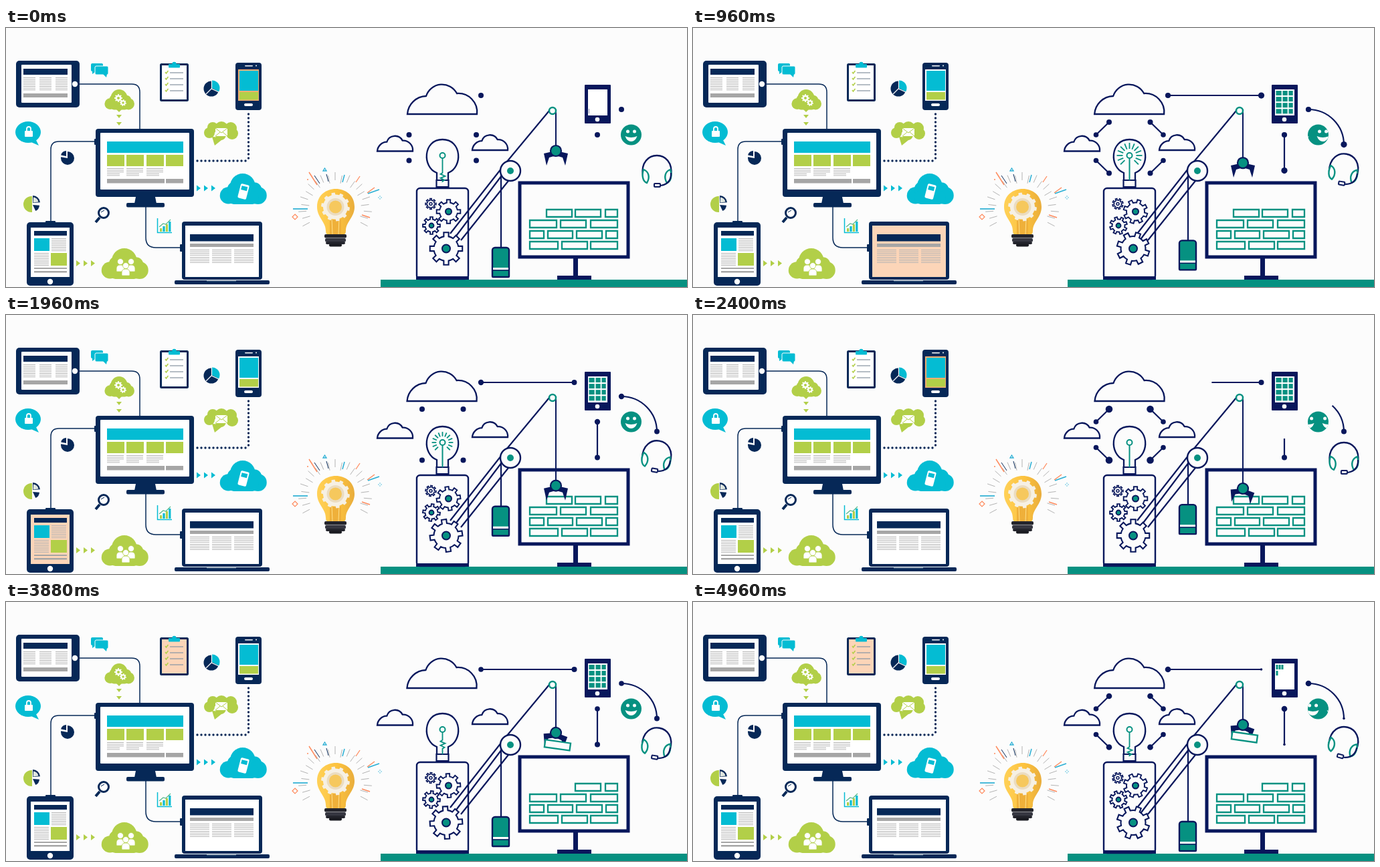
These frames come from a looping animation (1018 px wide and 388 px high, 5.04 s). An HTML page with a canvas:

```html
<!DOCTYPE html>
<html lang="en">
<head>
<meta charset="utf-8">
<title>Connected devices and idea machine</title>
<style>
html, body { margin: 0; height: 100%; overflow: hidden; background: #fcfcfc; }
canvas { display: block; }
</style>
</head>
<body>
<canvas id="stage" width="1018" height="388"></canvas>
<script>
const c = document.getElementById('stage').getContext('2d');
const LOOP = 5040, TAU = Math.PI * 2;
const BG = '#fcfcfc', NAVY = '#062857', INK = '#08175c', TEAL = '#04bcd3', LIME = '#b2cf48',
  GREEN = '#069181', GRAY = '#a6a6a6', PEACH = '#fcd5b8', WHITE = '#fff';

// Linear interpolation through [time, value] pairs
function key(t, ...pts) {
  if (t <= pts[0][0]) return pts[0][1];
  for (let i = 1; i < pts.length; i++) {
    const [a, u] = pts[i - 1], [b, v] = pts[i];
    if (t <= b) return u + (v - u) * (t - a) / (b - a);
  }
  return pts[pts.length - 1][1];
}

function paint(fill, stroke, width = 2.4) {
  if (fill) { c.fillStyle = fill; c.fill(); }
  if (stroke) { c.strokeStyle = stroke; c.lineWidth = width; c.stroke(); }
}
function box(x, y, w, h, fill, r = 0, stroke, width) {
  c.beginPath(); c.roundRect(x, y, w, h, r); paint(fill, stroke, width);
}
function dot(x, y, r, fill, stroke, width) {
  if (r <= 0) return;
  c.beginPath(); c.arc(x, y, r, 0, TAU); paint(fill, stroke, width);
}
function poly(pts, fill) {
  c.beginPath();
  for (let i = 0; i < pts.length; i += 2) c.lineTo(pts[i], pts[i + 1]);
  c.closePath(); paint(fill);
}
function path(d, fill, stroke, width) {
  const p = new Path2D(d);
  if (fill) { c.fillStyle = fill; c.fill(p); }
  if (stroke) { c.strokeStyle = stroke; c.lineWidth = width || 2.4; c.stroke(p); }
}
function line(x1, y1, x2, y2, color = INK, width = 2.2) {
  c.beginPath(); c.moveTo(x1, y1); c.lineTo(x2, y2); paint(null, color, width);
}
function at(x, y, angle, draw) {
  c.save(); c.translate(x, y); c.rotate(angle); draw(); c.restore();
}
function copy(x, y, w, n, gap = 2.6) {
  for (let i = 0; i < n; i++) box(x, y + i * gap, w, 1, '#b4b4b4');
}
function sector(x, y, r, a, b, fill) {
  c.beginPath(); c.moveTo(x, y); c.arc(x, y, r, a * TAU, b * TAU); c.closePath(); paint(fill);
}
function puff(x, y, w, h, fill) {
  for (const [u, v, r] of [[.18, .7, .27], [.32, .5, .24], [.49, .4, .4], [.74, .52, .24], [.82, .7, .28]])
    dot(x + w * u, y + h * v, h * r, fill);
  box(x + w * .16, y + h * .55, w * .68, h * .43, fill, h * .2);
}
function cloud(x, y, w, h) {
  const p = new Path2D();
  p.addPath(new Path2D('M0 44A29 29 0 0 1 28 17A25 25 0 0 1 74 13A28 28 0 0 1 104 44Z'),
    { a: w / 104, d: h / 44, e: x, f: y });
  path(p, BG, INK, 2.3);
}
function gear(x, y, r, R, n, a, fill, stroke, width) {
  c.beginPath();
  for (let i = 0; i < n; i++) {
    const m = a + i * TAU / n, s = TAU / n;
    for (const [q, k] of [[-.25, r], [-.19, R], [.19, R], [.25, r]])
      c.lineTo(x + k * Math.cos(m + q * s), y + k * Math.sin(m + q * s));
    c.arc(x, y, r, m + .25 * s, m + .75 * s);
  }
  c.closePath(); paint(fill, stroke, width);
}
function arrows(x, y, color, down) {
  for (let i = 0; i < (down ? 2 : 3); i++) {
    if (down) poly([x - 4, y + i * 11, x + 4, y + i * 11, x, y + 5 + i * 11], color);
    else poly([x + i * 11, y - 4.5, x + 6 + i * 11, y, x + i * 11, y + 4.5], color);
  }
}

function devices(t) {
  const lit = [120, 320, 480, 680, 880, 1080].findIndex(v => t % 1160 < v);
  const paper = i => Math.max(lit, 0) === i ? PEACH : WHITE;

  // Cables
  path('M110 84H188Q200 84 200 96V152M135 170H79Q67 170 67 182V291M209 266V314Q209 329 224 329H262', null, NAVY, 1.5);
  box(132, 166, 4, 9, NAVY, 1); box(59, 289, 15, 4, NAVY, 1); box(260, 324, 4, 11, NAVY, 1);
  for (let y = 129; y < 196; y += 6) dot(362.5, y, 1.7, NAVY);
  for (let x = 286; x < 364; x += 6) dot(x, 199, 1.7, NAVY);

  // Landscape tablet
  box(15, 49, 95, 70, NAVY, 5); box(23, 55, 75, 57, paper(3), 1);
  box(26, 61, 66, 9, NAVY);
  for (const x of [26, 50, 74]) copy(x, 74, 18, 8);
  box(26, 98, 66, 6, GRAY); dot(103, 84, 4.2, WHITE);

  // Speech bubbles
  box(127, 53, 18, 12, TEAL, 2); poly([129, 64, 136, 64, 129, 69], TEAL);
  box(133, 57, 20, 13, TEAL, 2, BG, 1); poly([145, 69, 151, 69, 150, 74], TEAL);

  // Clipboard
  box(231.5, 54.5, 40, 54, paper(2), 1, NAVY, 3);
  box(243, 54, 17, 5.5, TEAL, 1); dot(251.5, 54, 3.2, TEAL);
  for (const y of [67, 76, 85, 94]) {
    path(`M238 ${y - 1}l1.5 2 3-4`, null, LIME, 1.5);
    line(245, y, 265, y, '#8d9aa6', 1.3);
  }

  // Pie charts
  dot(307, 91, 11.5, NAVY); sector(308, 90, 11.5, -.25, .08, TEAL);
  path('M307.5 79V91L318 96M307 91L299 99', null, BG, 1.2);
  sector(92, 195, 10, -.25, .53, NAVY); sector(90, 192, 8, .53, .75, NAVY);
  dot(38, 264, 12, LIME); sector(39, 264, 13, -.25, .25, BG);
  sector(40, 262, 11, -.25, -.01, NAVY); sector(40, 265, 10, .01, .18, NAVY);
  sector(40.5, 261.5, 8, -.24, -.02, '#dfe6df');

  // Phone
  box(343, 52, 39, 71, NAVY, 4);
  box(347, 62, 31, 47, lit < 1 ? '#f0ae72' : WHITE);
  box(349, 64, 28, 30, TEAL); box(349, 96, 28, 11.5, LIME);
  box(356, 113, 13, 4, WHITE, 2); box(357, 56, 12, 1.6, WHITE, 1); dot(374, 56.5, 1, WHITE);

  // Lime cloud with gears
  puff(148, 92, 43, 31, LIME); poly([163, 120, 175, 120, 169, 126], LIME);
  gear(168, 105, 4.5, 6, 8, 0, WHITE); dot(168, 105, 2, LIME);
  gear(175, 112, 3.8, 5, 8, .2, WHITE); dot(175, 112, 1.7, LIME);
  arrows(169, 130, LIME, true);

  // Lock bubble
  c.beginPath(); c.ellipse(33, 156, 19, 16, 0, 0, TAU); paint(TEAL);
  poly([33, 169, 44, 166, 49, 176], TEAL);
  box(28, 154, 12, 9, WHITE, 1); path('M31 155V151a3 3 0 0 1 6 0V155', null, WHITE, 1.8);

  // Mail cloud
  for (const [x, y, r] of [[304, 157, 8], [309, 149, 8], [322, 150, 10], [336, 150, 9], [338, 158, 9], [321, 160, 8]])
    dot(x, y, r, LIME);
  poly([308, 163, 327, 164, 312, 176], LIME);
  box(313, 150, 18, 12, WHITE, 1); path('M313 150l9 7 9-7M313 162l7-6M331 162l-7-6', null, LIME, 1);

  // Desktop screen
  box(134, 151, 147, 102, NAVY, 4); box(141, 157, 133, 85, paper(1), 1);
  box(151, 170, 114, 17, TEAL);
  for (const x of [151, 180, 210, 239]) box(x, 190, 26, 17, LIME);
  for (const x of [151, 180, 210]) { copy(x, 210, 25, 3); copy(x, 217.8, 19, 2); }
  box(151, 226, 86, 6.5, GRAY); box(239, 226, 26, 6.5, GRAY);
  poly([194, 253, 223, 253, 225, 263, 192, 263], NAVY); box(180, 262, 57, 6.5, NAVY, 2);
  arrows(285, 240, TEAL);

  // Teal cloud
  puff(320, 218, 69, 47, TEAL);
  at(355, 245, .25, () => { box(-6.5, -11, 13, 22, WHITE, 2); box(-4.5, -8, 9, 6, TEAL); });

  // Magnifier
  line(140, 284, 134, 291, NAVY, 4); dot(146, 277, 7.5, WHITE, NAVY, 3);
  line(142, 276, 147, 273, NAVY, 1);

  // Chart
  path('M226.5 285V306.5H248', null, TEAL, 1.5);
  [5, 8, 11, 15].forEach((h, i) => box(230 + i * 4.4, 305 - h, 3.2, h, i % 2 ? TEAL : LIME));
  path('M229 298l6-5 4 1 7-7', null, '#57b98c', 1.2);

  // Laptop
  box(263, 290, 120, 87, NAVY, 4); box(268, 296, 110, 77, paper(5));
  box(275, 309, 95, 10.5, NAVY); box(275, 323, 95, 5, GRAY);
  for (const x of [275, 308, 341]) { copy(x, 332, 29, 4); copy(x, 343, 29, 4); }
  box(252, 378, 142, 6, NAVY, 2); box(300, 378, 44, 1.5, '#7288a2');

  // Portrait tablet
  box(31, 291, 70, 95, NAVY, 5); box(37, 299, 58, 74, paper(4));
  box(42, 304, 49, 7, NAVY); box(42, 315, 23, 19, TEAL); copy(68, 315, 22, 8);
  copy(42, 337, 22, 8); box(67, 337, 24, 19, LIME);
  box(42, 359, 49, 2, GRAY); box(42, 364, 49, 2.5, GRAY);
  dot(66, 380, 4.2, WHITE); arrows(105, 352.5, LIME);

  // People cloud
  puff(143, 330, 69, 47, LIME);
  for (const [x, y, r] of [[171, 350, 4.5], [187, 350, 4.5], [179, 356, 4.5]]) {
    dot(x, y, r, WHITE, LIME, .8); box(x - r - 1.5, y + r + .5, r * 2 + 3, 10, WHITE, [5, 5, 1, 1], LIME, .8);
  }
}

function idea() {
  for (let i = 0; i < 21; i++) {
    const a = (-208 + i * 11.8) * Math.PI / 180, r = i % 2 ? 39 : 43, R = i % 2 ? 51 : 55;
    line(492 + r * Math.cos(a), 271 + r * Math.sin(a), 492 + R * Math.cos(a), 271 + R * Math.sin(a), '#b3b3b3', 1);
  }
  const O = '#ff8b5e', B = '#2aafd4';
  line(429, 271, 451, 271, B, 1.7); line(532, 280, 544, 284, O, 1.5);
  line(453, 216, 465, 235, O, 1.5); line(461, 221, 469, 233, NAVY, 1);
  line(541, 248, 558, 242, B, 1.7); line(540, 247, 551, 239, O, 1.5);
  line(523, 231, 529, 222, O, 1.3); line(503, 231, 506, 220, B, 1.5); line(479, 219, 482, 230, NAVY, 1);
  path('M432 279l4 4-4 4-4-4Z', null, O, 1.2); path('M476.5 210l2.5 4h-5Z', null, B, 1.3);
  for (const [x, y] of [[557, 254], [561, 254], [559, 252], [559, 256]]) dot(x, y, .7, B);
  dot(451, 227, 1, O);

  const g = c.createLinearGradient(465, 0, 521, 0);
  g.addColorStop(0, '#ffd158'); g.addColorStop(.55, '#fcc23e'); g.addColorStop(1, '#e9ad3c');
  path('M465 268C465 232 521 232 521 268C521 284 508 290 508 304Q508 310 502 310H483Q478 310 478 304C478 290 465 284 465 268Z', g);
  path('M484 309V287H501V309Z', '#efb03a');
  line(487, 285, 488, 309, '#ffe08a', 1); line(498, 285, 497, 309, '#ffe08a', 1);
  gear(492.5, 268, 18.5, 21.5, 10, .15, '#f6f0e4'); dot(492.5, 268, 13, '#ebdcc0'); dot(492.5, 268, 9.5, '#f6c85d');
  box(476, 309, 33, 5.5, '#24252d', 2); box(477, 315, 31, 5.5, '#363741', 2);
  box(478, 320, 29, 4, '#24252d', 2); box(483, 323, 19, 4.5, '#1b1c22', 2);
}

// Link between two points, showing the part from a to b with a dot at each end
function link(x, y, X, Y, a, b, r, R) {
  const u = X - x, v = Y - y;
  if (b > a) line(x + u * a, y + v * a, x + u * b, y + v * b);
  dot(x, y, r, INK); dot(X, Y, R, INK);
}

function links(t) {
  const p = t % 1250;
  const a = p < 700 ? 0 : key(p, [1215, 0], [1250, 1]), b = p < 700 ? 0 : key(p, [700, 0], [775, 1]);
  const far = key(p, [140, 0], [240, 4], [1000, 4], [1150, 5.3], [1210, 4.5], [1235, 0]);
  const near = p < 500 ? key(p, [60, 4], [130, 0]) : key(p, [740, 0], [780, 3.8]);
  for (const [x, X] of [[622, 602.5], [683.5, 703]]) {
    link(x, 141, X, 160, a, b, far, near);
    link(x, 217.5, X, 198.5, a, b, far, near);
  }

  const q = t % 996;
  const s = q < 230 ? 0 : key(q, [230, 1], [292, .55], [408, .48], [450, 0]);
  const e = q < 230 ? 0 : key(q, [978, 1], [996, 0]);
  const r = q < 300 ? key(q, [60, 4], [130, 0]) : key(q, [436, 0], [454, 4], [940, 3.8], [976, 4.3]);
  const R = key(q, [130, 0], [220, 4], [900, 4], [960, 4.8], [976, 2], [986, 0]);
  link(710, 101, 849.5, 101, s, e, r, R);
  link(884, 160, 884, 213.5, s, e, r, R);
  if (e > s) {
    c.beginPath(); c.arc(920, 175, 53, (s - 1) * TAU / 4, (e - 1) * TAU / 4); paint(null, INK, 2.2);
  }
  dot(920, 122, r, INK); dot(973, 174.5, R, INK);
}

function lamp(t) {
  const p = t % 1250;
  path('M644 228V217C622 209 623 167 652.5 167C682 167 683 209 661 217V228', BG, INK, 2.3);
  box(643.5, 228, 18, 10, BG, 0, INK, 2.2);
  const zig = p < 330 || p > 1200 ? 223 - 21 * key(p, [0, 0], [270, 1], [1200, 1], [1201, 0]) : 0;
  if (zig) path(`M652.5 195V${zig - 6}l-3 2 7 3-7 3 6 3-3 2V228`, null, GREEN, 1.8);
  else line(652.5, 195, 652.5, 228, GREEN, 2);
  dot(652.5, 191, 4, BG, GREEN, 2);
  const grow = key(p, [540, 0], [770, 1], [1050, 1], [1120, 0]);
  if (grow > 0) for (let i = 0; i < 13; i++) {
    const m = Math.PI * (.75 + i * 1.5 / 12), u = 7 + 3 * grow, v = u + 9 * grow;
    line(652.5 + u * Math.cos(m), 191 + u * Math.sin(m), 652.5 + v * Math.cos(m), 191 + v * Math.sin(m), GREEN, 1.8);
  }
}

function phone(t) {
  box(865, 85, 39, 58, INK, 1); box(870, 92, 29, 39, WHITE); dot(884, 137, 3.3, WHITE);
  const n = t < 4700 ? key(t, [40, 0], [480, 12]) : key(t, [4700, 12], [4780, 0], [4880, 0], [4960, 4], [5040, 5]);
  if (n < 1) line(871.5, 121, 871.5, 128, '#8a91b5', 1);
  const shifted = t % 1760 > 1240 && t < 4700;
  for (let i = 0; i < Math.floor(n); i++) {
    const row = Math.floor(i / 3), k = i % 3;
    const edge = shifted && row % 2 ? [0, 6, 18, 27] : shifted ? [0, 11, 21, 27] : [0, 10, 19, 27];
    const small = t > 4700 && n < 6;
    box(871.5 + (small ? k * 4 : edge[k]), 94 + row * 9.1, small ? 3 : edge[k + 1] - edge[k] - 1.8, 7, GREEN);
  }
}

function face(t) {
  const turn = key(t, [840, 0], [960, 7], [1080, 15], [1240, 30], [1241, 0], [2280, 0], [2400, 15], [2520, 30],
    [2521, 0], [3080, 0], [3280, 24], [3360, 30], [3361, 0], [4760, 0], [4960, 22], [5040, 30]);
  c.save();
  dot(934.5, 160, 15.5, GREEN); c.clip();
  for (const dx of [turn - 30, turn]) at(934.5 + dx, 160, 0, () => {
    dot(-5, -5, 2.5, WHITE); dot(5, -5, 2.5, WHITE);
    path('M-9 2Q0 6 9 2Q6 10 0 10Q-6 10-9 2Z', WHITE);
  });
  c.restore();
}

function headset(t) {
  const tilt = Math.sin(Math.PI * t / 584) ** 4;
  at(973, 213 - 4 * tilt, 15 * tilt * Math.PI / 180, () => {
    path('M-21 8C-27-32 27-32 21 8', null, INK, 2.4);
    for (const s of [-1, 1]) {
      c.save(); c.scale(s, 1);
      path('M15 19C21 17 23 8 20-1C12 2 10 11 15 19Z', BG, GREEN, 2.4);
      c.restore();
    }
    path('M21 4Q22 20 6 23', null, INK, 2.2);
    box(-4, 20, 9, 5, BG, 1, INK, 2);
  });
}

function brick(x, y, w) { box(x + 1, y + 1, w - 2, 11, BG, 0, GREEN, 2.3); }

function machine(t) {
  const hubY = key(t, [400, 184], [960, 202], [1520, 234], [2050, 260], [2960, 260], [3280, 256], [3960, 188], [4060, 184]);
  const hubX = 822 + key(t, [4000, 0], [4200, -3], [4440, 2], [4700, -1], [4900, 0]);
  const held = t > 2800;

  // Screen and wall
  box(848, 344, 7, 30, INK); box(824, 371, 51, 6, INK);
  box(768, 232, 162, 111, BG, 0, INK, 5);
  [[[807, 40], [850, 40], [895, 20]], [[782, 42], [828, 40], [873, 42]],
   [[782, 23], [809, 39], [852, 40], [896, 19]], [[782, 44], [830, 40], [873, 42]]].forEach((row, j) =>
    row.forEach(([x, w], i) => { if (i || j || !held) brick(x, 271 + j * 16, w); }));

  // Tower and gears
  box(614, 240, 77, 136, BG, 5, INK, 2.4); box(613, 372, 79, 5, INK);
  const turn = key(t, [0, 0], [2400, 1], [3280, 1.4], [4440, 2.4], [4960, 2.45]) * TAU / 8;
  gear(635, 263.5, 5.5, 8, 8, -turn, BG, INK, 1.6); dot(635, 263.5, 2, BG, INK, 1.5);
  gear(661.5, 275, 13.5, 18, 8, turn, BG, INK, 1.9); dot(661.5, 275, 4.5, GREEN, INK, 2);
  gear(636, 296, 9.5, 13, 8, -turn, BG, INK, 1.9); dot(636, 296, 3.5, GREEN, INK, 1.8);
  line(664, 308, 744, 206); line(668, 318, 741, 221); line(680, 318, 751, 229);
  gear(658, 330.5, 18.5, 24.5, 8, turn, BG, INK, 2.1); dot(658, 330.5, 6, GREEN, INK, 2);

  // Crane arm and counterweight
  line(812, 124, 744, 206);
  const top = 329 - (hubY - 184) * .59;
  line(740, 218, 740, top);
  box(727, top, 25, 44, GREEN, [4, 4, 1, 1], INK, 2.4);
  box(728, top + 30, 23, 3.5, WHITE); line(727, top + 34, 752, top + 34, INK, 1.5);
  dot(754, 214, 15, BG, INK, 2.4); dot(754, 214, 5, GREEN);

  // Claw
  line(822, 125, hubX, hubY - 7, INK, 2);
  dot(817, 124, 5, BG, GREEN, 2.5);
  at(hubX, hubY, key(t, [2050, 0], [2350, .14]), () => {
    for (const s of [-1, 1]) poly([s * 5, 1, s * 18, 4, s * 14, 22, s * 10, 10, s * 3, 8], INK);
    if (held) at(5, 18, 0, () => brick(-20, -6.5, 40));
    dot(0, 0, 8, GREEN, INK, 2.2);
  });
}

function frame(now) {
  const t = now % LOOP;
  c.fillStyle = BG; c.fillRect(0, 0, 1018, 388);
  devices(t);
  idea();
  const sway = -.6 * Math.sin(TAU * t / 625);
  cloud(600 + sway, 85, 104, 44); cloud(555, 162, 53, 22.5); cloud(697, 160.5, 53, 22.5);
  links(t);
  lamp(t);
  box(560, 377, 458, 11, GREEN);
  machine(t);
  phone(t);
  face(t);
  headset(t);
  requestAnimationFrame(frame);
}
frame(0);
</script>
</body>
</html>
```
